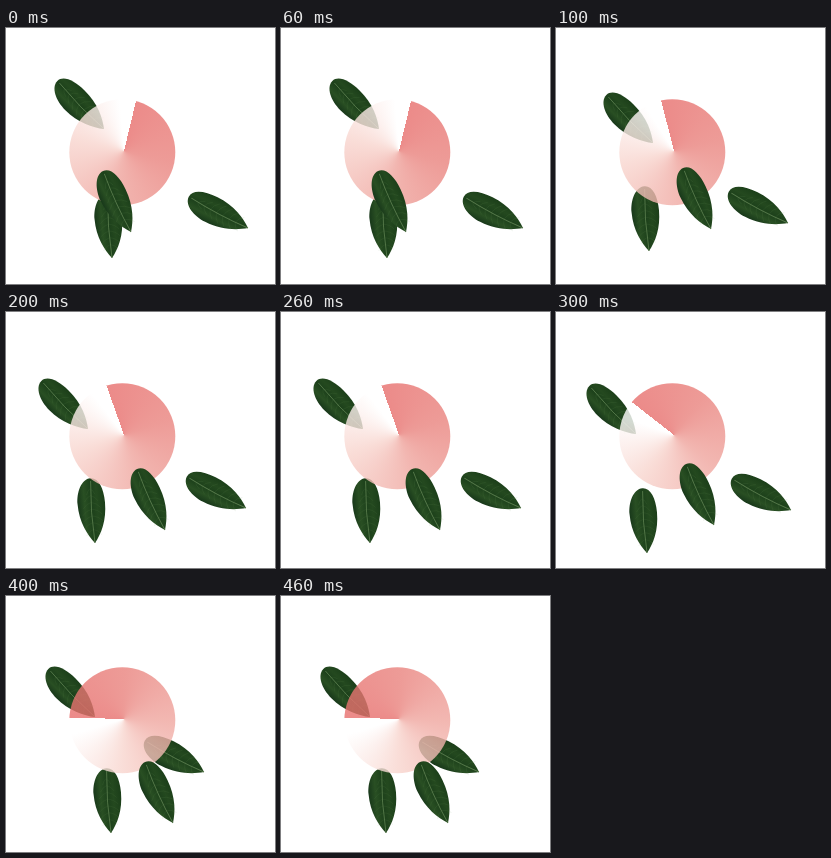
Write an HTML page with a canvas that moves like this. It is 269x256 px and loops after 0.5 s.

```html
<!DOCTYPE html>
<html lang="en">
<head>
<meta charset="utf-8">
<title>Peach and leaves</title>
<style>
  html, body { margin: 0; width: 100%; height: 100%; overflow: hidden; background: #fff; }
  canvas { display: block; }
</style>
</head>
<body>
<canvas width="269" height="256"></canvas>
<script>
const ctx = document.querySelector('canvas').getContext('2d');
const STEP = 100;
const rad = deg => deg * Math.PI / 180;

// Each leaf keeps its angle; only the pointed tip jumps from pose to pose.
const leaves = [
  { angle: 45, length: 67, tips: [[98, 101], [97, 115], [82, 117], [80, 122], [89, 121]] },
  { angle: 85, length: 65, tips: [[106, 230], [93, 223], [89, 231], [91, 241], [105, 237]] },
  { angle: 27, length: 67, tips: [[242, 200], [232, 195], [240, 196], [235, 198], [198, 176]] },
  { angle: 64.5, length: 67, tips: [[125, 204], [155, 201], [159, 218], [158, 213], [167, 227]], front: true }
];
const edgeAngles = [13.5, -14.3, -19.5, -52, -88.5];
const blush = [[0, '#e76e6c'], [0.25, '#e9827d'], [0.5, '#efa59e'], [0.75, '#f8d5ce'], [0.95, '#fff'], [1, '#fff']];

// The tip sits at the local origin and the blade runs along negative x.
const blade = new Path2D(
  'M0 0C-9 -7 -22 -13.5 -41 -13.5C-56 -13.5 -67 -9 -67 -1C-67 8 -54 14 -41 14C-23 14 -9 7 0 0Z');
const midrib = new Path2D('M0 0Q-32 2 -64 -1');
const veins = new Path2D();
for (let x = -14; x > -60; x -= 7) {
  for (const side of [-1, 1]) {
    const reach = 10 * Math.sin(Math.PI * Math.min(1, (-x + 6) / 72));
    veins.moveTo(x, 0.5);
    veins.quadraticCurveTo(x + 1, side * reach * 0.6, x + 6, side * reach);
  }
}

const green = ctx.createLinearGradient(0, -14, 0, 14);
[[0, '#1b3e19'], [0.3, '#24491f'], [0.5, '#1d411b'], [0.75, '#294f23'], [1, '#18381a']]
  .forEach(stop => green.addColorStop(...stop));

function drawLeaf({ angle, length, tips }, pose) {
  ctx.save();
  ctx.translate(...tips[pose]);
  ctx.rotate(rad(angle));
  ctx.scale(length / 67, 1);
  ctx.fillStyle = green;
  ctx.fill(blade);
  ctx.lineWidth = 0.5;
  ctx.strokeStyle = 'rgba(110, 150, 90, 0.22)';
  ctx.stroke(veins);
  ctx.lineWidth = 0.9;
  ctx.strokeStyle = '#56794a';
  ctx.stroke(midrib);
  ctx.restore();
}

function drawDisc(pose) {
  const fill = ctx.createConicGradient(rad(edgeAngles[pose] - 90), 118, 123);
  blush.forEach(stop => fill.addColorStop(...stop));
  // White underlay strength is folded into one translucent layer over the leaves.
  ctx.save();
  ctx.globalAlpha = 0.8;
  ctx.beginPath();
  ctx.arc(116.3, 124.2, 53, 0, 2 * Math.PI);
  ctx.fillStyle = fill;
  ctx.fill();
  ctx.restore();
}

function draw(now) {
  const pose = Math.floor(now / STEP) % edgeAngles.length;
  ctx.fillStyle = '#fff';
  ctx.fillRect(0, 0, 269, 256);
  leaves.filter(leaf => !leaf.front).forEach(leaf => drawLeaf(leaf, pose));
  drawDisc(pose);
  leaves.filter(leaf => leaf.front).forEach(leaf => drawLeaf(leaf, pose));
}

const start = performance.now();
function tick() {
  draw(performance.now() - start);
  requestAnimationFrame(tick);
}
tick();
</script>
</body>
</html>
```
